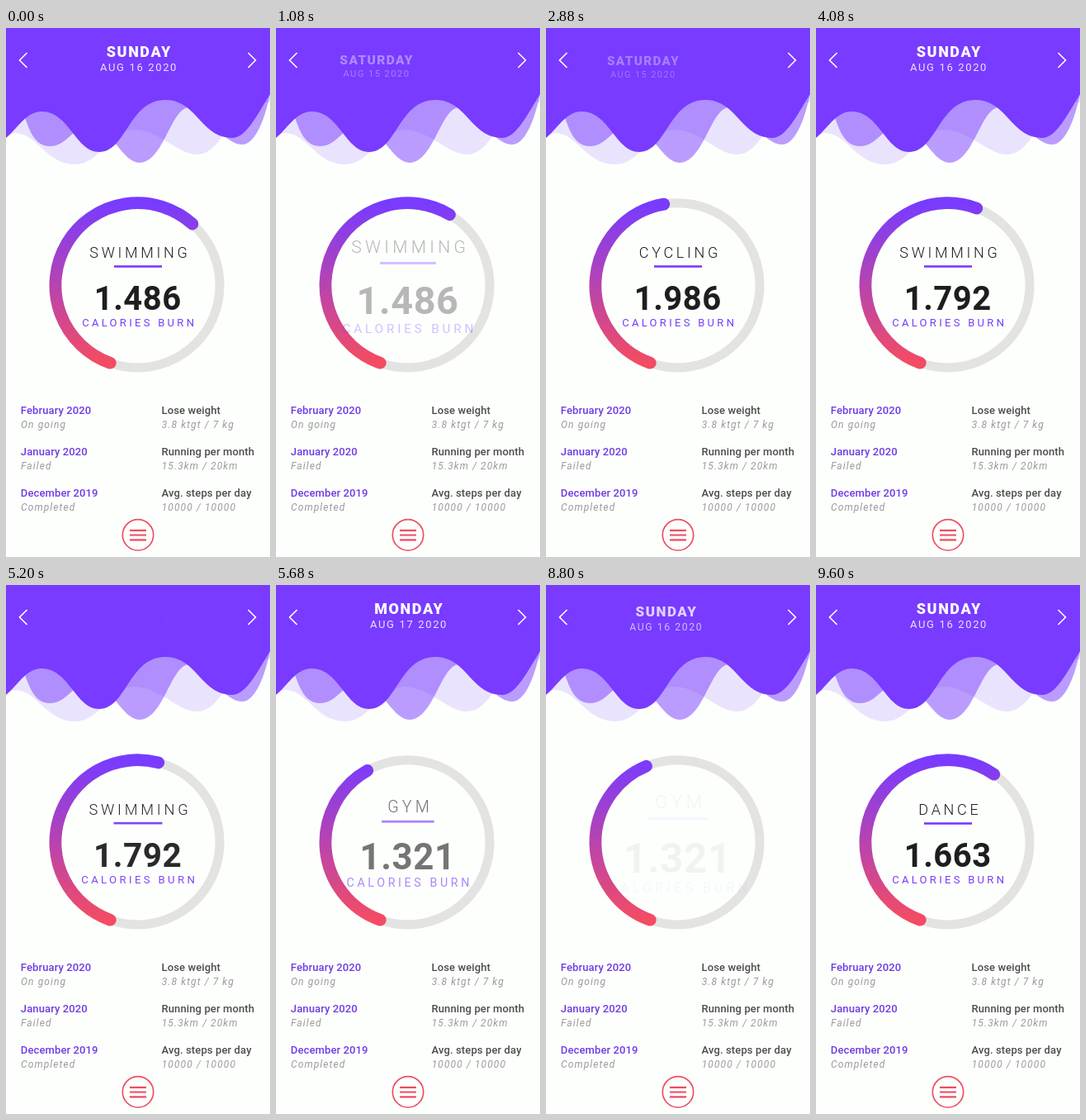
An HTML page for the animation above (9.92 s loop, 320 by 640 pixels).

```html
<!DOCTYPE html>
<html lang="en">
<head>
<meta charset="utf-8">
<title>Activity tracker</title>
<style>
  html, body { margin: 0; width: 100%; height: 100%; overflow: hidden; background: #fdfffd; }
  svg { display: block; width: 100vw; height: 100vh; font-family: Roboto, sans-serif; }
  .mid { text-anchor: middle; }
  .day { font-size: 18px; font-weight: 900; letter-spacing: 1.6px; fill: #fff; }
  .date { font-size: 13px; letter-spacing: 1.65px; fill: #fff; fill-opacity: .85; }
  .sport { font-size: 18px; font-weight: 300; letter-spacing: 3.7px; fill: #1c1c1c; }
  .amount { font-size: 40px; font-weight: 700; letter-spacing: .5px; fill: #1e1e1e; }
  .unit { font-size: 13px; letter-spacing: 3.3px; fill: #783bff; }
  .head { font-size: 13px; font-weight: 500; letter-spacing: .12px; }
  .note { font-size: 12px; font-style: italic; letter-spacing: 1.1px; fill: #9a9a9a; }
</style>
</head>
<body>
<svg viewBox="0 0 320 640" preserveAspectRatio="none">
  <defs>
    <linearGradient id="heat" gradientUnits="userSpaceOnUse" x1="0" y1="212" x2="0" y2="406">
      <stop offset="0" stop-color="#783bff"/>
      <stop offset="1" stop-color="#f44c62"/>
    </linearGradient>
  </defs>

  <g fill="#783bff">
    <path opacity=".14" d="M0 0H320V90H300C272 100 262 153 231 153C208 153 186 123 155 123C125 123 115 165 84 165C48 165 38 127 11 127Q4 128 0 131Z"/>
    <path opacity=".5" d="M0 0H320V80C312 118 300 141 286 141C262 141 242 96 222 96C200 96 191 163 162 163C140 163 128 118 100 118C82 118 75 143 53 143C34 143 28 122 22 106L0 100Z"/>
    <path d="M0 0H320V80C304 106 291 133 274 133C236 133 232 87 193 87C149 87 146 150 113 150C84 150 77 101 43 101C24 101 14 122 0 133Z"/>
  </g>
  <path d="M25.5 30L16.5 39L25.5 48M293.5 30L302.5 39L293.5 48" fill="none" stroke="#fff" stroke-width="1.6"/>

  <g id="header" class="mid">
    <text id="day" class="day" x="161.3" y="34.7"/>
    <text id="date" class="date" x="161" y="52.1"/>
  </g>

  <circle cx="159.5" cy="311.3" r="99.6" fill="none" stroke="#e3e4e2" stroke-width="11"/>
  <path id="arc" fill="none" stroke="url(#heat)" stroke-width="14.8" stroke-linecap="round"/>

  <g id="center" class="mid">
    <text id="sport" class="sport" x="162.4" y="278"/>
    <rect x="131" y="287.2" width="58" height="2.6" fill="#783bff"/>
    <text id="amount" class="amount" x="159.7" y="341"/>
    <text class="unit" x="161.7" y="360.7">CALORIES BURN</text>
  </g>

  <g id="list"></g>

  <g fill="none" stroke="#f04c62">
    <circle cx="160" cy="613.3" r="18.7" stroke-width="1.7"/>
    <path d="M150 607.8H170M150 613.5H170M150 619.4H170" stroke-width="2.2"/>
  </g>
</svg>

<script>
const LOOP = 9920;
const FADE = 405, SWAP_START = 378, SWAP = 345, SWEEP = 1560;
const RING = { x: 159.5, y: 311.3, r: 99.6, from: -160.5 };

// Each entry slides in at `at`; dir 1 moves on a day, -1 goes back. Angles are clockwise from the top.
const entries = [
  { at: -1e5, dir: 1, day: 'SUNDAY', date: 'AUG 16 2020', sport: 'SWIMMING', amount: '1.486', angle: 41.8 },
  { at: 495, dir: -1, day: 'SATURDAY', date: 'AUG 15 2020', sport: 'CYCLING', amount: '1.986', angle: -10.1 },
  { at: 2642, dir: 1, day: 'SUNDAY', date: 'AUG 16 2020', sport: 'SWIMMING', amount: '1.792', angle: 20.8 },
  { at: 4765, dir: 1, day: 'MONDAY', date: 'AUG 17 2020', sport: 'GYM', amount: '1.321', angle: -49 },
  { at: 8130, dir: -1, day: 'SUNDAY', date: 'AUG 16 2020', sport: 'DANCE', amount: '1.663', angle: 34.5 }
];

const goals = [
  ['February 2020', 'On going', 'Lose weight', '3.8 ktgt / 7 kg'],
  ['January 2020', 'Failed', 'Running per month', '15.3km / 20km'],
  ['December 2019', 'Completed', 'Avg. steps per day', '10000 / 10000']
];

const $ = id => document.getElementById(id);
const clamp = v => Math.min(1, Math.max(0, v));
const inOut = power => t => t < .5 ? (2 * t) ** power / 2 : 1 - (2 - 2 * t) ** power / 2;
const quad = inOut(2), cubic = inOut(3);

$('list').innerHTML = goals.map(([month, state, goal, score], i) => {
  const y = 467.2 + i * 49.8;
  const pair = (x, color, head, note) =>
    `<text class="head" x="${x}" y="${y}" fill="${color}">${head}</text>` +
    `<text class="note" x="${x + .2}" y="${y + 17}">${note}</text>`;
  return pair(17.8, '#6f3ae6', month, state) + pair(188.5, '#4c4c4c', goal, score);
}).join('');

function setText(id, value) {
  if ($(id).textContent !== value) $(id).textContent = value;
}

function place(id, opacity, scale, cx, cy, dx = 0, dy = 0) {
  $(id).setAttribute('opacity', opacity);
  $(id).setAttribute('transform',
    `translate(${cx + dx} ${cy + dy}) scale(${scale}) translate(${-cx} ${-cy})`);
}

// How far a group is from rest: 0 to 1 while leaving, then 1 to 0 while arriving.
function swap(t, start, length) {
  const arriving = t >= start + length;
  const p = quad(clamp((t - start) / length - (arriving ? 1 : 0)));
  return { arriving, away: arriving ? 1 - p : p };
}

function point(angle) {
  const a = angle * Math.PI / 180;
  return `${RING.x + RING.r * Math.sin(a)} ${RING.y - RING.r * Math.cos(a)}`;
}

function draw(time) {
  let i = entries.length - 1;
  while (entries[i].at > time) i--;
  const next = entries[i], prev = entries[Math.max(0, i - 1)];
  const t = time - next.at;

  const head = swap(t, 0, FADE);
  const shown = head.arriving ? next : prev;
  const side = head.arriving ? next.dir : -next.dir;
  setText('day', shown.day);
  setText('date', shown.date);
  place('header', 1 - head.away, 1 - .23 * head.away, 160.5, 38, side * 65 * head.away, 15 * head.away);

  const body = swap(t, SWAP_START, SWAP);
  const info = body.arriving ? next : prev;
  setText('sport', info.sport);
  setText('amount', info.amount);
  place('center', 1 - body.away, 1 + .25 * body.away, 160.5, 312);

  const angle = prev.angle + (next.angle - prev.angle) * cubic(clamp(t / SWEEP));
  const large = angle - RING.from > 180 ? 1 : 0;
  $('arc').setAttribute('d',
    `M${point(RING.from)}A${RING.r} ${RING.r} 0 ${large} 1 ${point(angle)}`);
}

function frame() {
  draw(performance.now() % LOOP);
  requestAnimationFrame(frame);
}
frame();
</script>
</body>
</html>
```
